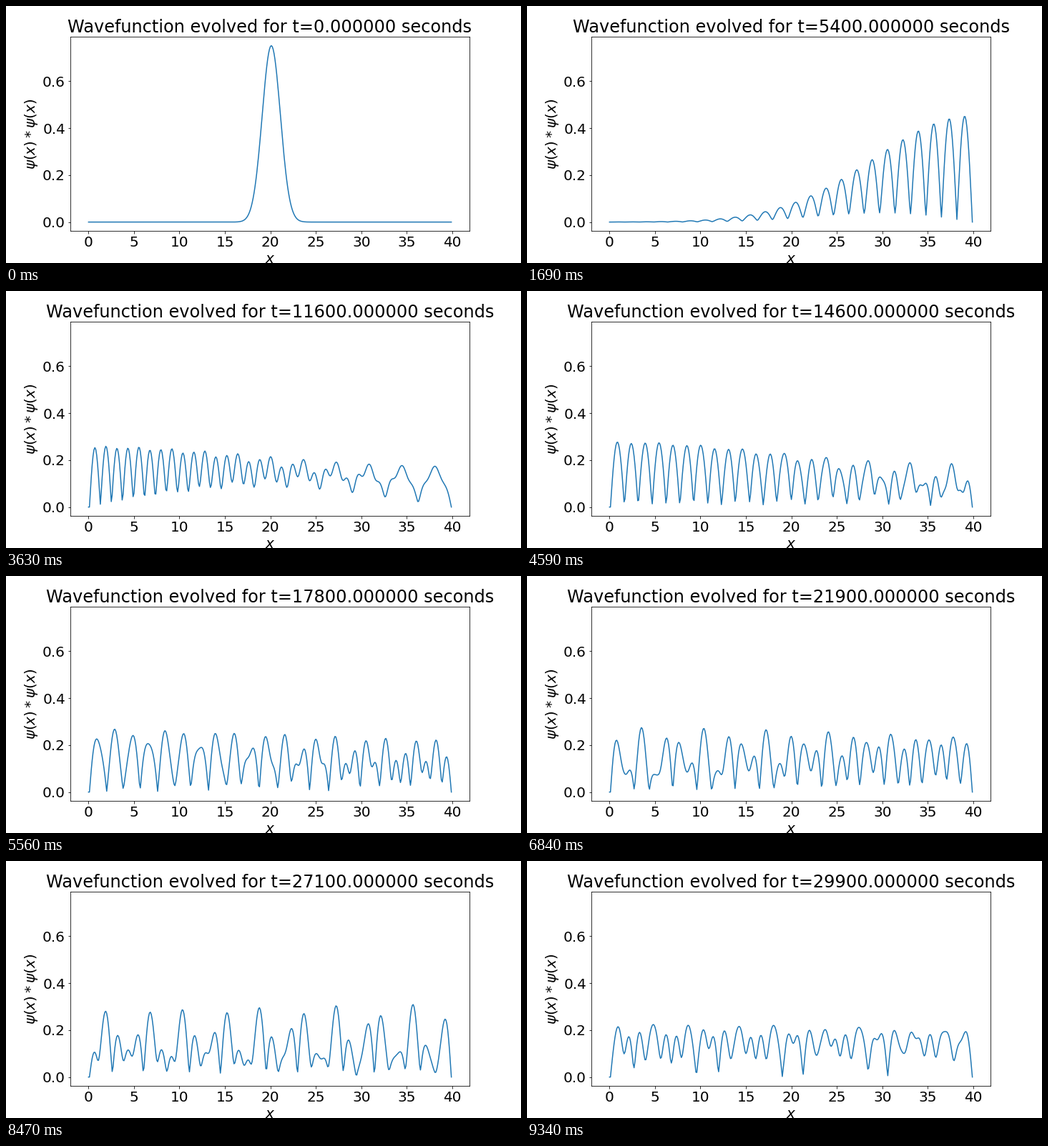
These frames come from a looping animation (720x360 px, 9.37 s). A matplotlib script:

```python
import numpy as np
import matplotlib.pyplot as plt
from matplotlib.animation import FuncAnimation

FRAMES = 300
LOOP_MS = 9370
STEP = 100        # label units per frame
RATE = 0.002      # natural time per label unit

# Gaussian packet in a hard-walled box, solved in lattice sine modes
dx = 0.1
x = dx * np.arange(400)
cells = 398
x0, k0 = 20.1, 2.0
damping = 1.5e-4

inner = x[2:399]
start = np.pi ** -0.25 * np.exp(-(inner - x0) ** 2 / 2 + 1j * k0 * inner)
n = np.arange(1, cells)
modes = np.sqrt(2 / cells) * np.sin(np.pi * np.outer(n, n) / cells)
energy = (1 - np.cos(np.pi * n / cells)) / dx ** 2
coeffs = modes @ start


def amplitude(label_time):
    tau = RATE * label_time
    phase = np.exp(-(1j * energy + damping * energy ** 2) * tau)
    psi = np.zeros(x.size)
    psi[2:399] = np.abs(modes @ (coeffs * phase))
    return psi


plt.rcParams.update({
    "font.family": "DejaVu Sans",
    "font.size": 20,
    "figure.facecolor": "white",
})

fig, ax = plt.subplots(figsize=(10, 5), dpi=72)
fig.subplots_adjust(left=0.125, right=0.9, bottom=0.125, top=0.88)

peak = np.pi ** -0.25
ax.set_xlim(-0.05 * x[-1], 1.05 * x[-1])
ax.set_ylim(-0.05 * peak, 1.05 * peak)
ax.set_xticks(range(0, 41, 5))
ax.set_yticks([0.0, 0.2, 0.4, 0.6])
ax.set_xlabel(r"$x$")
ax.set_ylabel(r"$\psi(x)*\psi(x)$")
title = ax.set_title("")
line, = ax.plot(x, amplitude(0), color="#1f77b4", lw=1.5)


def update(i):
    t = STEP * i
    line.set_ydata(amplitude(t))
    title.set_text(f"Wavefunction evolved for t={t:.6f} seconds")
    return line, title


anim = FuncAnimation(fig, update, frames=FRAMES, interval=LOOP_MS / FRAMES,
                     repeat=True, repeat_delay=0, blit=False)
plt.show()
```
